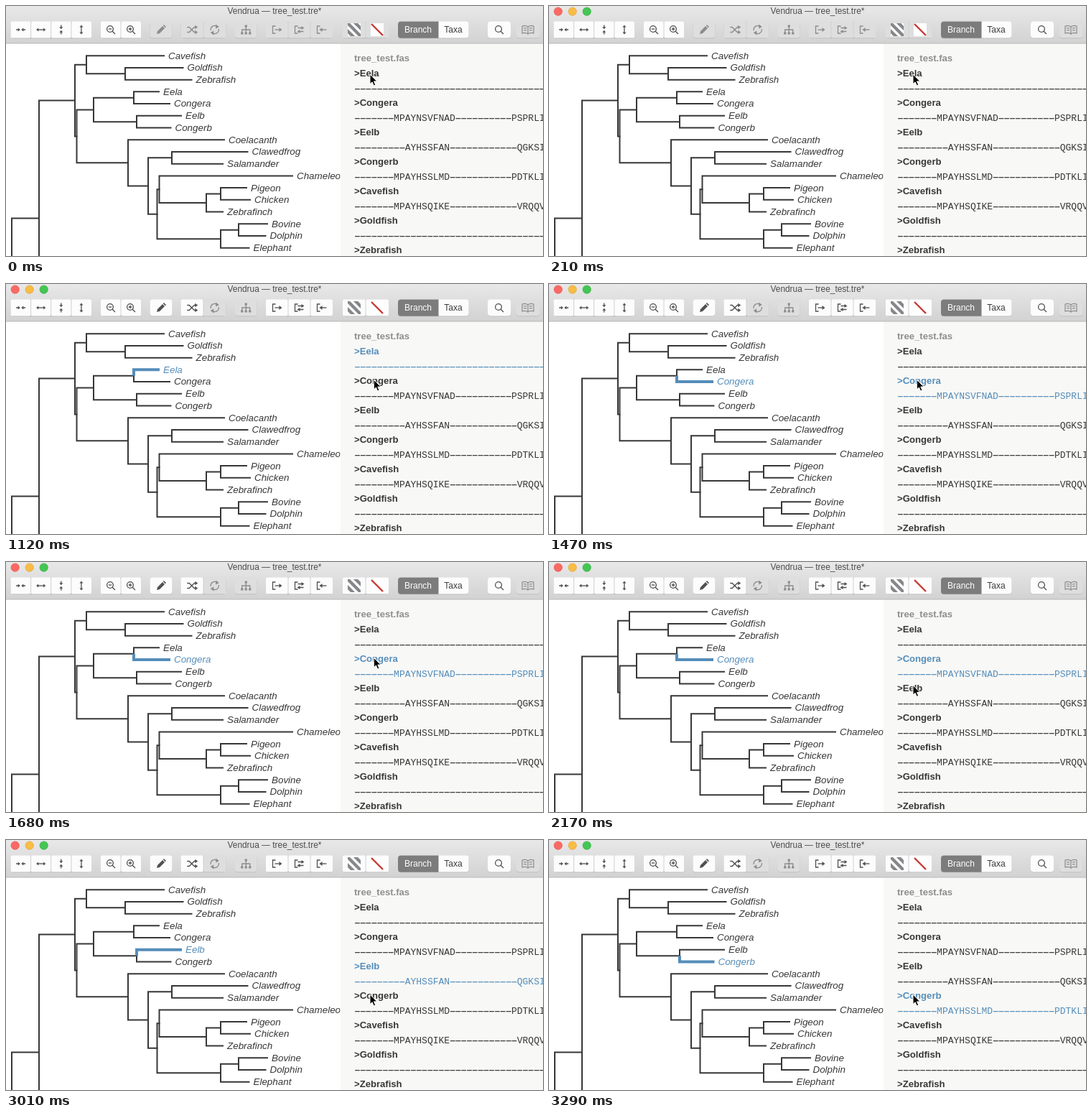
Recreate the animation shown at these times as an HTML page. Size 748x348 px, loop 3.36 s.

```html
<!DOCTYPE html>
<html lang="en">
<head>
<meta charset="utf-8">
<title>Tree and alignment viewer</title>
<style>
html, body { margin: 0; width: 100%; height: 100%; overflow: hidden; background: #fff; }
svg { display: block; font-family: "Liberation Sans", Arial, sans-serif; }
.taxon { color: #373737; }
.taxon.on { color: #558dba; }
.taxon text { fill: currentColor; }
.branch { fill: none; stroke: currentColor; stroke-width: 2; }
.on .branch { stroke-width: 4; }
.label { font-size: 13.4px; font-style: italic; }
.head { font-size: 13.1px; font-weight: bold; }
.seq { font: 13px "Liberation Mono", "Courier New", monospace; white-space: pre; }
.gap { stroke: currentColor; stroke-width: .4; }
.face { fill: #fcfcfc; }
.icon { fill: none; stroke: #505050; stroke-width: 1.3; }
.icon .solid { fill: #505050; stroke: none; }
.dim .icon, .idle .needs .icon { stroke: #8c8c8c; }
.dim .icon .solid, .idle .needs .icon .solid { fill: #8c8c8c; }
.dim .face, .idle .needs .face { fill: #dedede; }
.blur #lights { visibility: hidden; }
</style>
</head>
<body>
<svg id="stage" width="748" height="348" viewBox="0 0 748 348">
  <defs>
    <linearGradient id="bar" x2="0" y2="1">
      <stop offset="0" stop-color="#e9e8e9"/><stop offset="1" stop-color="#d3d2d3"/>
    </linearGradient>
    <clipPath id="left"><rect y="53" width="465.5" height="295"/></clipPath>
    <clipPath id="swatch"><rect x="-9" y="-9" width="18" height="18"/></clipPath>
  </defs>
  <rect x="466" y="52" width="282" height="296" fill="#f8f8f6"/>
  <g id="tree" clip-path="url(#left)"></g>
  <g id="align"></g>
  <rect width="748" height="52" fill="url(#bar)"/>
  <path d="M0 52H748" stroke="#b9b8b9"/>
  <g id="lights" stroke-width=".6">
    <circle cx="12.7" cy="7.6" r="5.7" fill="#f96a63" stroke="#e2504b"/>
    <circle cx="32.7" cy="7.6" r="5.7" fill="#f7bd45" stroke="#dfa036"/>
    <circle cx="52.7" cy="7.6" r="5.7" fill="#44c653" stroke="#2bac3a"/>
  </g>
  <text x="308.5" y="11" font-size="11.9" fill="#4c4c4c">Vendrua — tree_test.tre*</text>
  <g id="tools"></g>
  <path id="cursor" fill="#000" stroke="#fff" stroke-width="1"
    d="M0 0V13.6L3.1 10.8L5.3 15.8L7.7 14.8L5.5 9.9H9.8Z"/>
</svg>
<script>
const $ = id => document.getElementById(id);
const stage = $("stage");

// Tree: inner nodes are [x, child, child], tips are [x, name]
const tree = [96,
  [112, [220, "Cavefish"], [166, [246.5, "Goldfish"], [258.5, "Zebrafish"]]],
  [98.5,
    [122,
      [178, [213, "Eela"], [228, "Congera"]],
      [182, [244, "Eelb"], [229.5, "Congerb"]]],
    [170, [304, "Coelacanth"],
      [198,
        [231, [336.5, "Clawedfrog"], [302, "Salamander"]],
        [210.5,
          [213.5, [399, "Chameleon"],
            [279, [299, [335, "Pigeon"], [340, "Chicken"]], [302, "Zebrafinch"]]],
          [299, [324, [364, "Bovine"], [361.5, "Dolphin"]], [338.5, "Elephant"]]]]]]];

const isTip = node => typeof node[1] === "string";
let row = 0;

function place(node) {
  if (isTip(node)) return node.y = 69.2 + 16.72 * row++;
  return node.y = (place(node[1]) + place(node[2])) / 2;
}

function drawNode(node, px, py) {
  const [x, ...kids] = node;
  const line = `<path class="branch" d="M${px} ${py}V${node.y}H${x + 1}"/>`;
  if (isTip(node)) {
    return `<g class="taxon" data-name="${kids[0]}">${line}
      <text class="label" x="${x + 6}" y="${node.y + 4.4}">${kids[0]}</text></g>`;
  }
  return `<g class="taxon">${line}</g>` + kids.map(k => drawNode(k, x, node.y)).join("");
}

place(tree);
$("tree").innerHTML =
  `<g class="taxon"><path class="branch" d="M8 350V295.5H46V350"/></g>` +
  drawNode(tree, 46, 295.5);

// Alignment: numbers stand for gap lengths
const gaps = n => `<tspan class="gap" dy="1">${"\u2212".repeat(n)}</tspan>`;
const letters = s => `<tspan dy="-1">${s}</tspan>`;
const rows = [
  ["Eela", 36],
  ["Congera", 7, "MPAYNSVFNAD", 10, "PSPRLIS"],
  ["Eelb", 9, "AYHSSFAN", 12, "QGKSIL"],
  ["Congerb", 7, "MPAYHSSLMD", 11, "PDTKLIS"],
  ["Cavefish", 7, "MPAYHSQIKE", 12, "VRQQVL"],
  ["Goldfish", 36],
  ["Zebrafish", 36]
];
$("align").innerHTML =
  `<text class="head" x="485" y="77" fill="#8e8e8e">tree_test.fas</text>` +
  rows.map(([name, ...parts], i) => {
    const y = 98.4 + 41 * i;
    const seq = parts.map(p => typeof p === "number" ? gaps(p) : letters(p)).join("");
    return `<g class="taxon" data-name="${name}">
      <text class="head" x="485" y="${y}">&gt;${name}</text>
      <text class="seq" x="485.5" y="${y + 20.8}">${seq}</text></g>`;
  }).join("");

// Toolbar
const solid = d => `<path class="solid" d="${d}"/>`;
const path = d => `<path d="${d}"/>`;
const turn = s => `<g transform="rotate(90)">${s}</g>`;
const inward = path("M-6.5 0H-3M6.5 0H3") + solid("M-3.8-2.5L-.7 0L-3.8 2.5ZM3.8-2.5L.7 0L3.8 2.5Z");
const outward = path("M-4 0H4") + solid("M-3.4-2.5L-6.6 0L-3.4 2.5ZM3.4-2.5L6.6 0L3.4 2.5Z");
const lens = (d = "") => `<circle cx="-1" cy="-1" r="4.4"/>` +
  path("M2.2 2.2L6 6") + (d && path(d));
const bracket = path("M-2-5H-6V5H-2");
const paper = `<rect x="-9" y="-9" width="18" height="18" fill="#fff" stroke="none"/>`;
const icons = {
  narrow: inward, widen: outward, shorten: turn(inward), heighten: turn(outward),
  minus: lens("M-3.2-1H1.2"),
  plus: lens("M-3.2-1H1.2M-1-3.2V1.2"),
  pencil: solid("M-6 6L-5 2L2-5L5-2L-2 5ZM2.8-5.8L4-7L7-4L5.8-2.8Z"),
  shuffle: path("M-7-3.5H-4L3 3.5H5M-7 3.5H-4L3-3.5H5") +
    solid("M4-6.3L8-3.5L4-.7ZM4 .7L8 3.5L4 6.3Z"),
  refresh: path("M-5.5 1A5.5 5.5 0 0 1 3-4.6M5.5-1A5.5 5.5 0 0 1-3 4.6") +
    solid("M1.5-7.5L6-4L1.5-1.5ZM-1.5 7.5L-6 4L-1.5 1.5Z"),
  chart: path("M0-4V4M-5.5 4V0H5.5V4") +
    solid("M-1.6-6.6H1.6V-3.4H-1.6ZM-7.1 3.4H-3.9V6.6H-7.1ZM-1.6 3.4H1.6V6.6H-1.6ZM3.9 3.4H7.1V6.6H3.9Z"),
  send: bracket + path("M-3 0H4") + solid("M3-3L7 0L3 3Z"),
  swap: bracket + path("M-2-2.5H4M0 2.5H6") + solid("M3-5L7-2.5L3 0ZM1 0L-3 2.5L1 5Z"),
  fetch: bracket + path("M0 0H7") + solid("M1-3L-3 0L1 3Z"),
  stripes: paper + `<g clip-path="url(#swatch)" stroke="#85878a" stroke-width="4.4">` +
    path("M-14-14L14 14M-9-20L20 9M-20-9L9 20") + `</g>`,
  slash: paper + `<path d="M-8-8L8 8" stroke="#c63a35" stroke-width="2.4"/>`,
  search: lens(),
  book: `<g stroke-width="1.2">` +
    path("M0-4Q-3-6.5-8-5V5Q-3 3.5 0 6Q3 3.5 8 5V-5Q3-6.5 0-4V6") +
    path("M-6-2.5L-2-1.8M-6 .5L-2 1.2M6-2.5L2-1.8M6 .5L2 1.2") + `</g>`
};

const TOP = 21.6, TALL = 22.8;
const box = (x, w, attrs, y = TOP) =>
  `<rect x="${x}" y="${y}" width="${w}" height="${TALL}" ${attrs}/>`;
const shadow = (x, w) => box(x, w, `rx="4" fill="#b7b7b7"`, TOP + .8);

function group(x, w, names, cls = "") {
  const step = w / names.length;
  const cells = names.map((name, i) => {
    const left = x + step * i;
    const sep = i ? `<path d="M${left} ${TOP}v${TALL}" stroke="#d2d2d2"/>` : "";
    return `<g class="${name === "refresh" ? "dim" : ""}">
      ${box(left, step, `class="face" rx="${names.length > 1 ? 2 : 4}"`)}${sep}
      <g class="icon" transform="translate(${left + step / 2} 33)">${icons[name]}</g></g>`;
  });
  return `<g class="${cls}">${shadow(x, w)}${cells.join("")}</g>`;
}

$("tools").innerHTML =
  group(6.5, 112.5, ["narrow", "widen", "shorten", "heighten"]) +
  group(132, 56, ["minus", "plus"]) +
  group(200.5, 31, ["pencil"], "needs") +
  group(243.5, 63, ["shuffle", "refresh"], "needs") +
  group(319, 30.5, ["chart"], "dim") +
  group(362, 93, ["send", "swap", "fetch"], "needs") +
  group(469, 64, ["stripes", "slash"], "needs") +
  group(671, 32, ["search"]) +
  group(711, 32, ["book"], "dim") +
  shadow(546, 98.5) + box(546, 98.5, `class="face" rx="4"`) +
  `<path d="M602.5 21.6H550a4 4 0 0 0-4 4V40.8a4 4 0 0 0 4 4H602.5Z" fill="#7c7c7c"/>
   <g font-size="12" text-anchor="middle">
     <text x="574" y="37.3" fill="#fff">Branch</text>
     <text x="623" y="37.3" fill="#3c3c3c">Taxa</text>
   </g>`;

// Timeline in ms
const LOOP = 3360, TICK = 70, WAKE = 70;
const picks = [[280, "Eela"], [1470, "Congera"], [2240, "Eelb"], [3150, "Congerb"]];
const start = [507, 95];
const moves = [[700, 1050, 512.3, 133.2], [1750, 2100, 507, 171.5], [2590, 2940, 507, 215]];
const taxa = [...document.querySelectorAll("[data-name]")];
const ease = u => u * u * (3 - 2 * u);

function cursorAt(t) {
  let [x, y] = start;
  for (const [a, b, tx, ty] of moves) {
    const k = ease(Math.min(1, Math.max(0, (t - a) / (b - a))));
    x += (tx - x) * k;
    y += (ty - y) * k;
  }
  return `translate(${x} ${y})`;
}

function render(ms) {
  const t = Math.floor((ms % LOOP) / TICK) * TICK;
  const picked = picks.filter(p => p[0] <= t).map(p => p[1]).pop();
  taxa.forEach(g => g.classList.toggle("on", g.dataset.name === picked));
  stage.classList.toggle("idle", !picked);
  stage.classList.toggle("blur", t < WAKE);
  $("cursor").setAttribute("transform", cursorAt(t));
}

const t0 = performance.now();
function loop() {
  render(performance.now() - t0);
  requestAnimationFrame(loop);
}
loop();
</script>
</body>
</html>
```
